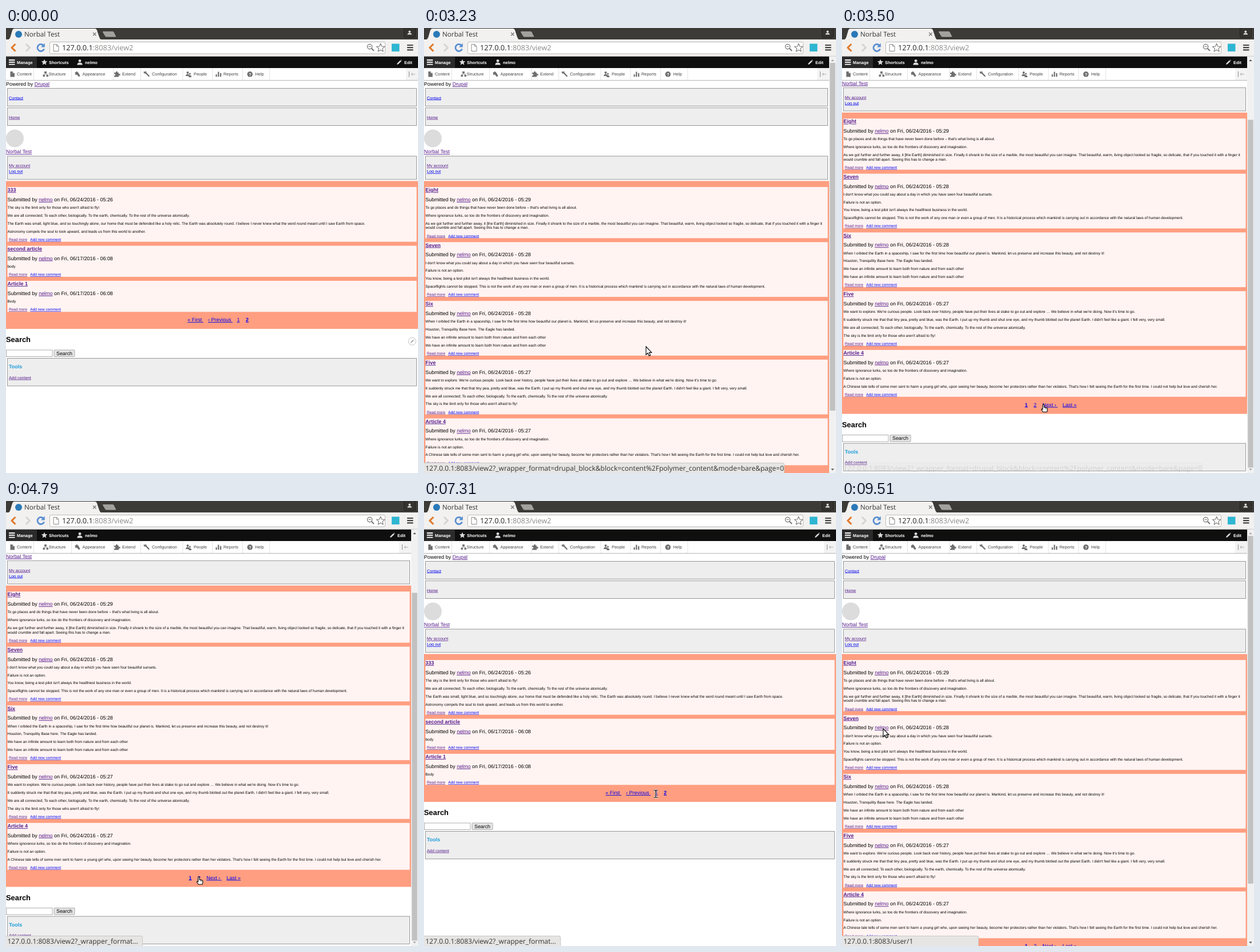
Recreate the animation shown at these times as an HTML page. Size 720 px wide and 778 px high, loop 9620 ms.

```html
<!DOCTYPE html>
<html lang="en">
<head>
<meta charset="utf-8">
<title>Paged articles</title>
<style>
html, body { margin: 0; width: 100%; height: 100%; overflow: hidden; background: #fff; }
#stage { position: relative; width: 720px; height: 778px; overflow: hidden; }
svg { position: absolute; left: 0; top: 0; display: block; }
text { font-family: "Liberation Sans", Arial, sans-serif; white-space: pre; text-rendering: geometricPrecision; }
.b { font-weight: bold; }
.l, .v { text-decoration: underline; }
.l { fill: #00e; }
.v { fill: #551a8b; }
.ui { font-family: "Open Sans", "Noto Sans", sans-serif; }
#status {
  position: absolute; left: 0; top: 760px; height: 18px; box-sizing: border-box;
  overflow: hidden; white-space: pre; padding-left: 2.5px;
  font: 12px/17px "Open Sans", "Noto Sans", sans-serif; color: #333;
  background: #e6e5e4; border: solid #c9c8c6; border-width: 1px 1px 0 0;
  border-radius: 0 4px 0 0; text-rendering: geometricPrecision;
}
</style>
</head>
<body>
<div id="stage">
  <svg id="view" width="720" height="778" viewBox="0 0 720 778"></svg>
  <div id="status"></div>
  <svg id="top" width="720" height="778" viewBox="0 0 720 778"></svg>
</div>
<script>
const LOOP = 9620, USER = 'nelmo', SITE = 'Norbal Test', MAX_SCROLL = 119.7;
const $ = id => document.getElementById(id);

const text = (x, y, s, size, cls = '', fill = '') =>
  `<text x="${x}" y="${y}" font-size="${size}" class="${cls}"${fill && ` fill="${fill}"`}>${s}</text>`;
const rect = (x, y, w, h, fill, more = '') =>
  `<rect x="${x}" y="${y}" width="${w}" height="${h}" fill="${fill}" ${more}/>`;
const circle = (x, y, r, fill, more = '') => `<circle cx="${x}" cy="${y}" r="${r}" fill="${fill}" ${more}/>`;
const path = (d, fill, more = '') => `<path d="${d}" fill="${fill}" ${more}/>`;
const line = (d, color, w = 1, more = '') => path(d, 'none', `stroke="${color}" stroke-width="${w}" ${more}`);
const frame = (y, h, W) => rect(2.5, y, W - 5, h, '#eee', 'stroke="#8e8e8e" stroke-width=".9"');

function star(cx, cy, r) {
  let d = '';
  for (let i = 0; i < 10; i++) {
    const a = i * Math.PI / 5, k = i % 2 ? r * .45 : r;
    d += (i ? 'L' : 'M') + (cx + k * Math.sin(a)).toFixed(2) + ' ' + (cy - k * Math.cos(a)).toFixed(2);
  }
  return d + 'Z';
}

// ---- page content ----
const sky = "The sky is the limit only for those who aren't afraid to fly!";
const connected = 'We are all connected; To each other, biologically. To the earth, chemically. To the rest of the universe atomically.';
const ignorance = 'Where ignorance lurks, so too do the frontiers of discovery and imagination.';
const failure = 'Failure is not an option.';
const learn = 'We have an infinite amount to learn both from nature and from each other';

// A line starting with "+" continues the paragraph above it.
const first = [
  ['Eight', '06/24/2016 - 05:29', "To go places and do things that have never been done before – that's what living is all about.", ignorance,
    'As we got further and further away, it [the Earth] diminished in size. Finally it shrank to the size of a marble, the most beautiful you can imagine. That beautiful, warm, living object looked so fragile, so delicate, that if you touched it with a finger it',
    '+would crumble and fall apart. Seeing this has to change a man.'],
  ['Seven', '06/24/2016 - 05:28', "I don't know what you could say about a day in which you have seen four beautiful sunsets.", failure,
    "You know, being a test pilot isn't always the healthiest business in the world.",
    'Spaceflights cannot be stopped. This is not the work of any one man or even a group of men. It is a historical process which mankind is carrying out in accordance with the natural laws of human development.'],
  ['Six', '06/24/2016 - 05:28', 'When I orbited the Earth in a spaceship, I saw for the first time how beautiful our planet is. Mankind, let us preserve and increase this beauty, and not destroy it!',
    'Houston, Tranquility Base here. The Eagle has landed.', learn, learn],
  ['Five', '06/24/2016 - 05:27', "We want to explore. We're curious people. Look back over history, people have put their lives at stake to go out and explore … We believe in what we're doing. Now it's time to go.",
    "It suddenly struck me that that tiny pea, pretty and blue, was the Earth. I put up my thumb and shut one eye, and my thumb blotted out the planet Earth. I didn't feel like a giant. I felt very, very small.",
    connected, sky],
  ['Article 4', '06/24/2016 - 05:27', ignorance, failure,
    "A Chinese tale tells of some men sent to harm a young girl who, upon seeing her beauty, become her protectors rather than her violators. That's how I felt seeing the Earth for the first time. I could not help but love and cherish her."]
];
const second = [
  ['333', '06/24/2016 - 05:26', sky, connected,
    'The Earth was small, light blue, and so touchingly alone, our home that must be defended like a holy relic. The Earth was absolutely round. I believe I never knew what the word round meant until I saw Earth from space.',
    'Astronomy compels the soul to look upward, and leads us from this world to another.'],
  ['second article', '06/17/2016 - 06:08', 'body'],
  ['Article 1', '06/17/2016 - 06:08', 'Body']
];

function articles(list, W) {
  let y = 278, out = '';
  for (const [title, date, ...lines] of list) {
    let p = y + 38.2, body = '';
    lines.forEach((s, i) => {
      const cont = s[0] === '+';
      if (i) p += cont ? 7.5 : 13.8;
      body += text(2.5, p, cont ? s.slice(1) : s, 6.47);
    });
    const end = p + 14.2;
    out += rect(2.5, y, W - 5, end + 1.9 - y, '#fff4f2')
      + text(2.5, y + 8.2, title, 9, 'b v')
      + text(2.5, y + 24.9, `Submitted by <tspan class="v">${USER}</tspan> on Fri, ${date}`, 8.95)
      + body + text(5, end, 'Read more', 6.5, 'v') + text(42.3, end, 'Add new comment', 6.5, 'l');
    y = end + 2 + 6.9;
  }
  return out;
}

function page(W, list, shift, pager) {
  const y = shift;
  return text(0, 101, 'Powered by <tspan class="v">Drupal</tspan>', 8.95)
    + frame(105.5, 31, W) + text(5, 124.5, 'Contact', 7.28, 'l')
    + frame(139.5, 31, W) + text(5, 158.6, 'Home', 7.28, 'v')
    + circle(15.5, 193, 15.5, '#dcdcdc')
    + text(0, 219.4, SITE, 8.95, 'v')
    + frame(224, 40.7, W) + text(5, 243.3, 'My account', 7.28, 'v') + text(5, 253.3, 'Log out', 7.28, 'l')
    + rect(0, 267.5, W, 258.5 + y, '#ff9e80') + articles(list, W)
    + pager.map(([x, s, bold]) => text(x, 513 + y, s, 9, bold ? 'l b' : 'l')).join('')
    + text(0, 549 + y, 'Search', 12.9, 'b')
    + rect(.5, 563 + y, 80.5, 11.5, '#fff', 'stroke="#a5a5a5" stroke-width=".9"')
    + rect(84, 563 + y, 36, 11.5, '#e6e6e6', 'rx="1" stroke="#a0a0a0" stroke-width=".9"')
    + text(88, 571.7 + y, 'Search', 8.85)
    + frame(577.5 + y, 48.3, W) + text(5, 595 + y, 'Tools', 9, 'b', '#1d9ddd')
    + text(5, 613.7 + y, 'Add content', 7.28, 'v');
}

// ---- site toolbar ----
const pencil = (x, y, color, k = 1) =>
  `<g transform="translate(${x} ${y}) scale(${k})">` + path('M-4 4L-3.2 1.4L2 -3.6L3.8 -1.8L-1.4 3.2ZM2.6 -4.2L3.2 -4.7L4.8 -3.1L4.3 -2.5Z', color) + '</g>';

function bar(W) {
  const g = '#6f6f6f';
  const tabs = [['Content', 19, 48], ['Structure', 74.5, 114], ['Appearance', 133.5, 187], ['Extend', 203, 235],
    ['Configuration', 255, 308.5], ['People', 328, 360.5], ['Reports', 380, 413], ['Help', 435.5, 460.5]];
  let out = rect(0, 49.5, W, 20.5, '#0f0f0f') + rect(0, 49.5, 54, 20.5, '#2b2b2b')
    + line('M5 56H15.5M5 59.8H15.5M5 63.6H15.5', '#fff', 1.9)
    + text(19, 62.7, 'Manage', 7.4, 'b', '#fff')
    + path(star(67, 60, 5.6), '#ddd') + text(75, 62.7, 'Shortcuts', 7.45, 'b', '#fff')
    + circle(129, 57.3, 2.4, '#ddd') + path('M124.3 64.5Q124.5 61 127.5 60.4H130.5Q133.5 61 133.7 64.5Z', '#ddd')
    + text(138, 62.7, USER, 7.45, 'b', '#fff')
    + pencil(W - 33, 60, '#ddd') + text(W - 24, 62.7, 'Edit', 7.4, 'b', '#fff')
    + rect(0, 70, W, 21.5, '#fff') + rect(0, 91, W, 1, '#b5b5b5') + rect(W - 21, 70, 21, 21, '#f3f3f3');
  for (const [s, x, edge] of tabs) out += text(x, 83.2, s, 7.4, '', '#444') + rect(edge, 70, .8, 21, '#ddd');
  out += path('M7.5 76H11.5L15 79.2V85.5H7.5Z', g) + path('M11.7 76.2V79H14.8Z', '#ddd')
    + path('M67 76H71V79H67ZM64.5 82H68V85H64.5ZM70.5 82H74V85H70.5Z', g) + line('M69 79V80.5M66.2 82V80.5H72.2V82', g, .8)
    + path('M120.5 78L124 75.8L127 79L129.5 83.5L127.5 85.5L123.6 81.3L121.5 82.5Z', g)
    + path('M189 78H192V76H195V78H197V80.3H199.5V83H197V85.5H189V83H191V80.5H189Z', g)
    + line('M243.2 77.2L249.7 84', g, 2.2, 'stroke-linecap="round"') + circle(243, 77.4, 2.4, g) + path('M241 75L243 77.2L244 75Z', '#fff')
    + circle(317.5, 78, 2, g) + path('M314 84Q314.3 80.6 317.5 80.5Q320.7 80.6 321 84Z', g)
    + circle(321.4, 80, 1.5, g) + path('M319 86Q319.3 82.5 321.5 82.5Q324 82.6 324.2 86Z', g)
    + path('M366.5 81H368.7V85.3H366.5ZM370.2 76.5H372.4V85.3H370.2ZM374 79H376.2V85.3H374Z', g)
    + circle(426.3, 80.8, 4.8, g) + text(424.2, 83.6, '?', 7.4, 'b', '#fff')
    + line(`M${W - 15.5} 76V85.5`, '#999', 1.2) + line(`M${W - 5} 80.8H${W - 12}M${W - 9.5} 78.5L${W - 12} 80.8L${W - 9.5} 83`, '#aaa', 1);
  return out;
}

// ---- browser window ----
function browser() {
  return rect(0, 0, 720, 20.5, '#3c3b37')
    + rect(0, 20, 720, 29.5, '#f2f1f0') + rect(0, 48.8, 720, .8, '#c4c2bf')
    + path('M0 20.5H3Q6 20 7.5 16L11 4Q12 1 15 1H155Q158 1 159 4L163 16Q164.5 20 167 20.5Z', '#f2f1f0')
    + path('M168.5 5.5H186Q188 5.5 189 7.5L192.5 14.5Q193 16 191 16H176Q174 16 173 14.5L168.5 7Q168 5.5 169.5 5.5Z', '#a3a19d', 'stroke="#2a2926" stroke-width=".6"')
    + circle(22, 11, 6, '#2a79b8') + text(32, 15, SITE, 11.7, 'ui', '#333')
    + line('M152 8L157.5 13.5M157.5 8L152 13.5', '#777', 1.3)
    + rect(695.5, -2, 20, 18.5, '#34332f', 'rx="2" stroke="#23221f"')
    + circle(705.3, 6.3, 1.9, '#ddd') + path('M701.5 11.5Q701.7 8.6 705.3 8.6Q708.9 8.6 709.1 11.5Z', '#ddd')
    + line('M16.5 28L10 34.3L16.5 40.6', '#e07a2c', 3, 'stroke-linejoin="round"')
    + line('M35 28L41.5 34.3L35 40.6', '#d8d4cf', 3, 'stroke-linejoin="round"')
    + line('M66 31.2A6 6 0 1 0 66.6 36.5', '#5b8fd0', 2.8) + path('M67.8 26.5V33.5H61Z', '#5b8fd0')
    + rect(76.5, 24.5, 586, 20.5, '#fff', 'rx="2.5" stroke="#bdbab6"')
    + line('M83 28.5H88.5L92 32V40.5H83ZM88.5 28.5V32H92', '#888', 1)
    + text(98, 39, '127.0.0.1<tspan fill="#8a8a8a">:8083/view2</tspan>', 12.7, 'ui', '#222')
    + circle(635.6, 32.6, 4.2, 'none', 'stroke="#777" stroke-width="1.3"') + line('M638.8 35.8L643 40', '#777', 2) + line('M633.4 32.6H637.8', '#777', 1)
    + path(star(654.7, 34.8, 7.6), '#fff', 'stroke="#777" stroke-width="1.1" stroke-linejoin="round"')
    + rect(674, 27.5, 13.5, 13.5, '#2fb6d2')
    + line('M701 30H711.5M701 34.2H711.5M701 38.4H711.5', '#444', 2.2);
}

const scrollbar = rect(708, 49.5, 12, 729, '#f1f1f1')
  + '<path id="up" d="M711.3 58L714 55L716.7 58Z"/><path id="down" d="M711.3 770.5L714 773.5L716.7 770.5Z"/>'
  + '<rect id="thumb" x="709.3" width="9.4" height="608" fill="#c1c1c1"/>';

$('view').innerHTML = rect(0, 0, 720, 778, '#fff')
  + '<g id="one"><g id="scroll">' + page(708, first, 268.3, [[319.5, '1', 1], [335, '2'], [350.3, 'Next › '], [385.5, 'Last »']])
  + '</g>' + bar(708) + scrollbar + '</g>'
  + '<g id="two">' + page(720, second, 0, [[317.3, '« First '], [353, '‹ Previous '], [403.5, '1'], [419, '2', 1]])
  + '<g id="edit">' + circle(709.8, 547.8, 6.6, '#fff', 'stroke="#bbb" stroke-width=".9"') + pencil(709.8, 547.8, '#aaa', .75) + '</g>'
  + bar(720) + '</g>' + browser();

const beam = 'M-3.6 -6.5H-1.3L0 -5.6L1.3 -6.5H3.6M0 -5.6V5.6M-3.6 6.5H-1.3L0 5.6L1.3 6.5H3.6';
$('top').innerHTML = '<g id="cursor">'
  + '<g id="arrow">' + path('M0 0V14.2L3.2 11.3L5.3 16.2L7.7 15.2L5.6 10.4H9.8Z', '#fff', 'stroke="#000" stroke-width="1.1"') + '</g>'
  + '<g id="hand">' + path('M-1.2 8V.8Q0 -.8 1.2 .8V5L5.8 6Q7 6.4 6.9 8V10.3L6 13.2H-.8L-3.5 9.2Q-3.4 7.3 -1.2 8.8Z', '#fff', 'stroke="#000" stroke-width="1.1"')
  + line('M3 6V8.5M5 6.5V8.5', '#000', .6) + '</g>'
  + '<g id="beam">' + line(beam, '#fff', 2.6) + line(beam, '#000', 1.2) + '</g></g>';

// ---- motion ----
// time, x, y, shape, glide: a gliding step moves on towards the next one
const steps = [
  [680, 410, 515, 'beam'], [1180, 406, 515, 'beam'], [1280, 407, 507, 'arrow'], [1480, 405, 507, 'hand'],
  [2630, 406, 512, 'beam'], [2920, 405, 514, 'arrow', 1], [3180, 388, 557, 'arrow'], [3280, 388, 557, 'arrow', 1],
  [3480, 352, 658, 'hand'], [3580, 352, 658, 'hand', 1], [3880, 355, 666, 'arrow'], [3930, 355, 666, 'arrow', 1],
  [4210, 339, 664, 'arrow'], [4350, 338, 655, 'arrow'], [4450, 337, 657, 'hand'], [5250, 338, 662, 'beam'],
  [5290, 338, 660, 'arrow'], [5640, 338, 660, 'arrow', 1], [6030, 400, 520, 'arrow'], [6130, 400, 520, 'arrow', 1],
  [6510, 404, 511, 'hand'], [6610, 403, 507, 'hand'], [7310, 405, 512, 'beam'], [7800, 405, 512, 'beam', 1],
  [8080, 192, 518, 'beam'], [8130, 192, 518, 'beam', 1], [8380, 100, 440, 'arrow', 1], [8670, 73, 402, 'arrow'],
  [8870, 72, 395, 'hand'], [9020, 72, 399, 'hand'], [9510, 72, 398, 'arrow']
];
const link = '127.0.0.1:8083/view2?_wrapper_format';
const fullLink = link + '=drupal_block&block=content%2Fpolymer_content&mode=bare&page=0';
// fade in from/to, fade out from/to, text
const hints = [
  [1480, 1870, 3260, 3545, link + '…'], [4600, 4790, 5640, 5850, link + '…'],
  [6610, 6890, 8130, 8400, link + '…'], [8870, 9020, LOOP, LOOP + 1, '127.0.0.1:8083/user/1']
];

const ramp = (t, a, b) => Math.min(1, Math.max(0, (t - a) / (b - a)));
const show = (id, on) => $(id).setAttribute('visibility', on ? 'inherit' : 'hidden');

function moveCursor(t) {
  const i = steps.findLastIndex(s => s[0] <= t);
  show('cursor', i >= 0);
  if (i < 0) return;
  const [from, x, y, shape, glide] = steps[i];
  let k = 0, next = steps[i];
  if (glide) {
    next = steps[i + 1];
    k = ramp(from + Math.floor((t - from) / 50 + 1) * 50, from, next[0]);
  }
  $('cursor').setAttribute('transform', `translate(${x + (next[1] - x) * k} ${y + (next[2] - y) * k})`);
  for (const id of ['arrow', 'hand', 'beam']) show(id, id === shape);
}

function drawHint(t) {
  const box = $('status'), h = hints.find(h => t >= h[0] && t < h[3]);
  box.style.opacity = h ? ramp(t, h[0], h[1]) * (1 - ramp(t, h[2], h[3])) : 0;
  if (!h) return;
  const wide = h === hints[0] ? ramp(t, 3080, 3200) : 0;
  box.style.width = 239 + 391 * wide + 'px';
  box.textContent = wide ? fullLink : h[4];
}

function draw(t) {
  const one = t >= 2680 && t < 5290 || t >= 7360;
  show('one', one);
  show('two', !one);
  show('edit', t < 290 || t >= 5870 && t < 6000);
  const s = t < 3330 || t >= 5290 ? 0 : t < 3380 ? 40 : t < 3430 ? 80 : MAX_SCROLL;
  $('scroll').setAttribute('transform', `translate(0 ${-s})`);
  $('thumb').setAttribute('y', 61 + 99.5 * s / MAX_SCROLL);
  $('up').setAttribute('fill', s ? '#505050' : '#a3a3a3');
  $('down').setAttribute('fill', s < MAX_SCROLL ? '#505050' : '#a3a3a3');
  drawHint(t);
  moveCursor(t);
}

const start = performance.now();
function tick() {
  draw((performance.now() - start) % LOOP);
  requestAnimationFrame(tick);
}
tick();
</script>
</body>
</html>
```
